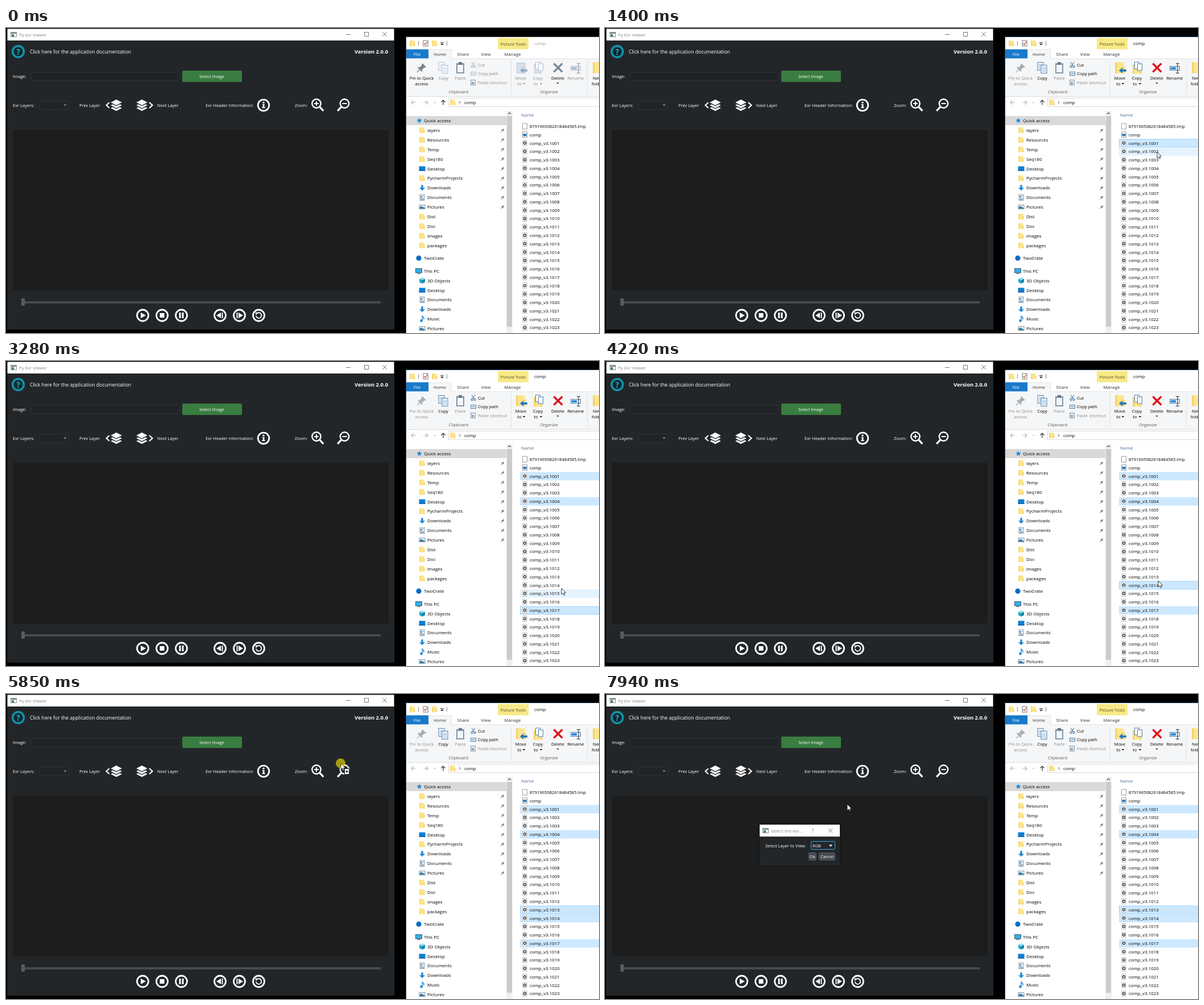
An HTML page with a canvas for the animation above (8 s loop, 1043 by 537 pixels).

```html
<!DOCTYPE html>
<html lang="en">
<head>
<meta charset="utf-8">
<title>Py Exr Viewer</title>
<style>
html, body { margin: 0; width: 100%; height: 100%; overflow: hidden; background: #000; }
canvas { display: block; width: 1043px; height: 537px; }
</style>
</head>
<body>
<canvas id="stage"></canvas>
<script>
const W = 1043, H = 537, LOOP = 8000;
const canvas = document.getElementById('stage');
const dpr = window.devicePixelRatio || 1;
canvas.width = W * dpr;
canvas.height = H * dpr;
const c = canvas.getContext('2d');
const FONT = '"Open Sans", "Noto Sans", sans-serif';
const BODY = '#232629', WHITE = '#fff', INK = '#000', BLUE = '#1e88d8';

// Pointer moves: start, end, steps, target x, target y
const MOVES = [
  [70, 530, 7, 970, 200], [700, 700, 1, 969, 199],
  [1250, 1560, 5, 973, 246], [1790, 2030, 4, 984, 280], [2110, 2110, 1, 984, 299],
  [2190, 2580, 6, 977, 433], [3060, 3280, 4, 977, 400], [3370, 3450, 2, 976, 391],
  [4140, 4220, 2, 973, 387], [4360, 4420, 2, 965, 383],
  [5150, 5150, 1, 955, 386], [5220, 5220, 1, 925, 387], [5300, 5380, 2, 853, 266],
  [5460, 5540, 2, 715, 167], [5620, 5850, 4, 589, 122], [5920, 5920, 1, 564, 118],
  [6000, 6230, 4, 491, 101], [7790, 7940, 3, 426, 194]
];
const PRESSES = [[850, 1010], [1640, 1720], [2980, 3140], [3980, 4140], [4680, 4980], [5150, 6700]];
const PICKS = [[1, 850], [4, 1640], [17, 2980], [14, 3980], [13, 4680]];
const DRAG = 5220, DROP = 6700;

// Share of a stepped change that is done at time t
function stepped(t, start, end, n) {
  if (t < start) return 0;
  if (n === 1 || t >= end) return 1;
  return (Math.floor((t - start) / (end - start) * (n - 1) + 1e-6) + 1) / n;
}

function pointerAt(t) {
  let x = 1052, y = 520;
  for (const [start, end, n, tx, ty] of MOVES) {
    const k = stepped(t, start, end, n);
    x += (tx - x) * k;
    y += (ty - y) * k;
  }
  return [Math.round(x), Math.round(y)];
}

function rect(x, y, w, h, fill, stroke) {
  if (fill) { c.fillStyle = fill; c.fillRect(x, y, w, h); }
  if (stroke) { c.strokeStyle = stroke; c.lineWidth = 1; c.strokeRect(x + .5, y + .5, w - 1, h - 1); }
}

function rounded(x, y, w, h, r, fill, stroke) {
  c.beginPath();
  c.roundRect(x + .5, y + .5, w - 1, h - 1, r);
  if (fill) { c.fillStyle = fill; c.fill(); }
  if (stroke) { c.strokeStyle = stroke; c.lineWidth = 1; c.stroke(); }
}

function trace(pts) {
  c.beginPath();
  for (let i = 0; i < pts.length; i += 2) c.lineTo(pts[i], pts[i + 1]);
}

function poly(fill, ...pts) {
  trace(pts);
  c.closePath();
  c.fillStyle = fill;
  c.fill();
}

function line(color, width, ...pts) {
  trace(pts);
  c.strokeStyle = color;
  c.lineWidth = width;
  c.stroke();
}

function disc(x, y, r, fill) {
  c.beginPath();
  c.arc(x, y, r, 0, 7);
  c.fillStyle = fill;
  c.fill();
}

function ring(x, y, r, width, color, from = 0, to = 7) {
  c.beginPath();
  c.arc(x, y, r, from, to);
  c.strokeStyle = color;
  c.lineWidth = width;
  c.stroke();
}

function text(s, x, y, size = 7.8, color = INK, align = 'left', weight = 400) {
  c.font = `${weight} ${size}px ${FONT}`;
  c.textAlign = align;
  c.fillStyle = color;
  c.fillText(s, x, y);
}

const label = (s, x, y, align) => text(s, x, y, 7.5, WHITE, align);

function cross(x, y, r, color, width) {
  line(color, width, x - r, y - r, x + r, y + r);
  line(color, width, x + r, y - r, x - r, y + r);
}

function windowIcon(x, y) {
  rect(x, y, 11, 9, '#f4f4f4', '#8a8f94');
  rect(x + 1, y + 1, 9, 2, '#7d8b96');
  rect(x + 2, y + 4, 4, 4, '#35826f');
}

/* ---- viewer window ---- */

function layersIcon(x, y) {
  for (const dy of [5, 0, -5]) {
    const pts = [x, y + dy - 5.8, x + 11.5, y + dy, x, y + dy + 5.8, x - 11.5, y + dy];
    poly(WHITE, ...pts);
    line(BODY, 1.4, ...pts, pts[0], pts[1]);
  }
}

function magnifier(x, y, dir, plus) {
  ring(x, y, 7.7, 2.4, WHITE);
  line(WHITE, 2, x - 4, y, x + 4, y);
  if (plus) line(WHITE, 2, x, y - 4, x, y + 4);
  line(WHITE, 3.2, x + dir * 5.8, y + 5.8, x + dir * 12.3, y + 12.8);
}

function playerButtons() {
  const y = 506;
  for (const x of [240.5, 274.5, 308.5, 376.5, 410.5, 444.5]) ring(x, y, 10, 2.8, WHITE);
  poly(WHITE, 237, y - 5, 246, y, 237, y + 5);
  rect(270.5, y - 4, 8, 8, WHITE);
  rect(304.5, y - 5, 3, 10, WHITE);
  rect(309.5, y - 5, 3, 10, WHITE);
  poly(WHITE, 370, y, 378, y - 5, 378, y + 5);
  rect(379.5, y - 5, 2, 10, WHITE);
  rect(405.5, y - 5, 2, 10, WHITE);
  poly(WHITE, 409, y - 5, 417, y, 409, y + 5);
  ring(444.5, y, 4.8, 1.8, WHITE, -2.2, 3);
  poly(WHITE, 438.5, y - 5.5, 444, y - 5, 439.5, y - .5);
}

function viewer() {
  rect(2, 1, 681, 530, BODY);
  rect(2.5, 1.5, 680, 20.5, WHITE);
  windowIcon(8, 7);
  text('Py Exr Viewer', 23, 15, 7.8, '#858585');
  line('#777', 1, 598, 11.5, 606, 11.5);
  rect(630, 7, 8, 8, null, '#777');
  cross(666, 11, 3.8, '#777', 1);

  disc(21.5, 41.5, 11.7, '#1191a6');
  disc(21.5, 41.5, 8, '#0f2630');
  text('?', 21.5, 46.5, 13.5, '#25b4cb', 'center', 700);
  text('Click here for the application documentation', 42, 45, 8.6, WHITE);
  text('Version 2.0.0', 672, 45, 9.4, WHITE, 'right', 700);

  label('Image:', 12, 88);
  rounded(44, 78, 262, 15, 2, '#202326', '#2d3135');
  rounded(309.5, 74.5, 106, 21, 2, '#397d40');
  label('Select Image', 362, 88, 'center');

  label('Exr Layers:', 12, 139);
  rounded(59, 128, 52, 16, 2, '#212427', '#2e3236');
  poly('#7c8084', 101, 134.5, 107, 134.5, 104, 137.8);
  label('Prev Layer', 129, 139);
  line(WHITE, 2.2, 182, 131, 176.5, 136, 182, 141);
  layersIcon(194, 136);
  layersIcon(239, 136);
  line(WHITE, 2.2, 252, 131, 257.5, 136, 252, 141);
  label('Next Layer', 266, 139);
  label('Exr Header Information:', 351, 139);
  ring(453, 136, 9.8, 2.8, WHITE);
  disc(453, 131.3, 1.7, WHITE);
  rect(450.8, 134, 3.6, 1.6, WHITE);
  rect(451.8, 134, 2.6, 6.4, WHITE);
  rect(450.2, 139.4, 5.6, 1.6, WHITE);
  label('Zoom:', 508, 139);
  magnifier(546, 133, 1, true);
  magnifier(595.5, 133, -1, false);

  rect(12, 179, 661, 283, '#1d1d1d');
  rect(30, 481, 629, 4, '#484a4c');
  rounded(26.5, 475.5, 7, 14, 1, '#5a5c5e');
  playerButtons();
}

/* ---- file browser ---- */

function folder(x, y, s = 1) {
  rect(x - 4.5 * s, y - 5 * s, 8 * s, 10 * s, '#fde58a');
  rect(x - 4.5 * s, y - 5 * s, 1.5 * s, 10 * s, '#f4d268');
  rect(x + 2.5 * s, y - 1 * s, 2 * s, 6 * s, '#f6d672');
}

function page(x, y, w = 9, h = 11, edge = '#9a9a9a') {
  rect(x - w / 2, y - h / 2, w, h, WHITE, edge);
}

const navIcons = {
  folder,
  star(x, y) {
    const pts = [];
    for (let i = 0; i < 10; i++) {
      const a = i * Math.PI / 5 - Math.PI / 2, r = i % 2 ? 2.2 : 5;
      pts.push(x + r * Math.cos(a), y + r * Math.sin(a));
    }
    poly(BLUE, ...pts);
  },
  desktop(x, y) {
    rect(x - 5.5, y - 4, 11, 8, '#0f7fd3');
    rect(x - 5.5, y + 2.5, 11, 1.5, '#0b5a9c');
  },
  down(x, y) {
    rect(x - 1.7, y - 5, 3.4, 6, BLUE);
    poly(BLUE, x - 5, y, x + 5, y, x, y + 5);
  },
  doc(x, y) {
    page(x, y, 9, 11, '#8b98a3');
    rect(x - 3, y - 3, 3, 3, '#3d93d6');
    for (let i = 0; i < 3; i++) rect(x - 3, y + 1 + i * 1.6, 6, .8, '#5b7f9e');
    rect(x + .8, y - 3, 2.4, 1, '#5b7f9e');
  },
  picture(x, y) {
    rect(x - 5.5, y - 4, 11, 8, '#e9f3fa', '#8c979f');
    poly('#3b7eaa', x - 4.5, y + 3, x - 4.5, y, x - 1, y - 1.5, x + 4.5, y + 2, x + 4.5, y + 3);
  },
  dot(x, y) { disc(x, y, 4.6, '#0a6cc4'); },
  pc(x, y) {
    rect(x - 6, y - 4.5, 12, 8, '#35b0ee', '#3d5a6c');
    rect(x - 3, y + 4, 6, 1.2, '#3d5a6c');
  },
  cube(x, y) {
    poly('#8fe0ee', x, y - 5.5, x + 5, y - 3, x, y - .5, x - 5, y - 3);
    poly('#22a7c4', x - 5, y - 3, x, y - .5, x, y + 5.5, x - 5, y + 3);
    poly('#1286a8', x + 5, y - 3, x, y - .5, x, y + 5.5, x + 5, y + 3);
  },
  note(x, y) {
    disc(x - 1.5, y + 3.2, 2.3, BLUE);
    line(BLUE, 1.4, x + .2, y + 3, x + .2, y - 5, x + 3.2, y - 1.5, x + 2.6, y + .8);
  }
};

const NAV = [
  ['Quick access', 'star', 163], ['layers', 'folder'], ['Resources', 'folder'], ['Temp', 'folder'],
  ['Seq180', 'folder'], ['Desktop', 'desktop'], ['PycharmProjects', 'folder'], ['Downloads', 'down'],
  ['Documents', 'doc'], ['Pictures', 'picture'], ['Dist', 'folder'], ['Doc', 'folder'],
  ['images', 'folder'], ['packages', 'folder'], ['TwoCrate', 'dot', 405.2], ['This PC', 'pc', 427.7],
  ['3D Objects', 'cube'], ['Desktop', 'desktop'], ['Documents', 'doc'], ['Downloads', 'down'],
  ['Music', 'note'], ['Pictures', 'picture']
];

function navPane() {
  rect(704, 155, 177, 16, '#d9d9d9');
  let y = 0;
  NAV.forEach(([name, icon, top], i) => {
    y = top || y + 16.9;
    const x = top ? 727 : 732;
    navIcons[icon](x - (top && i ? 1 : 0), y);
    text(name, top ? 735 : 741, y + 3, 8);
    if (i > 0 && i < 10) {
      line('#6b7680', 2.2, 872.6, y + 1, 875.5, y - 2);
      line('#6b7680', 1, 871.5, y - 1.4, 875, y + 2);
      line('#6b7680', .9, 873, y + .6, 870, y + 3.6);
    }
  });
  rect(880, 146, 11, 391, '#f0f0f0');
  rect(881, 155, 9, 371, '#cbcbcb');
  line('#505050', 1.2, 883, 151.5, 885.5, 149, 888, 151.5);
}

function ribbon(active) {
  const on = active ? INK : '#8c8c8c', off = '#8c8c8c';
  const soft = active ? '#4d7ba6' : '#a9bccd';
  rect(703, 16, 340, 38, WHITE);
  rect(865, 17.5, 54, 20, '#f8e987');
  text('Picture Tools', 892, 31, 7.5, '#4f4a25', 'center');
  text('comp', 929, 30, 7.8, active ? INK : '#999');
  folder(715, 27);
  line('#888', 1, 725.5, 23, 725.5, 31);
  page(738, 27, 9, 11, '#777');
  line('#c0452b', 1.3, 735.5, 27, 737.5, 29.5, 741, 24);
  folder(754, 27);
  line('#333', 1, 764, 25.5, 770, 25.5);
  poly('#222', 764, 27.5, 770, 27.5, 767, 30.5);
  line('#888', 1, 775.5, 23, 775.5, 31);

  rect(703, 54, 340, 67, '#f5f6f7');
  rect(703, 120, 340, 1, '#dadbdc');
  rect(703.5, 37.5, 39.5, 16, '#1979ca');
  rect(743, 38, 41, 17, '#f5f6f7');
  line('#e2e3e4', 1, 743.5, 54, 743.5, 38, 783.5, 38, 783.5, 54, W, 54);
  text('File', 723, 49, 7.8, WHITE, 'center');
  [['Home', 763], ['Share', 804], ['View', 844], ['Manage', 891]]
    .forEach(([s, x]) => text(s, x, 49, 7.8, '#333', 'center'));

  const caption = (s, x, y, color) => text(s, x, y, 7.6, color, 'center');
  const pinInk = active ? off : INK, pin = active ? '#a5adb5' : '#77838d';
  c.save();
  c.translate(730, 71);
  c.rotate(Math.PI / 4);
  rect(-4.5, -8, 9, 2.5, pin);
  rect(-3, -6, 6, 7, pin);
  rect(-5, 1, 10, 2.5, pin);
  rect(-.7, 3, 1.4, 7, pin);
  c.restore();
  caption('Pin to Quick', 731, 91, pinInk);
  caption('access', 731, 101, pinInk);

  for (const [x, y] of [[766, 67.5], [772, 72.5]]) {
    page(x, y, 11, 15, soft);
    for (let i = 0; i < 4; i++) rect(x - 3.5, y - 4 + i * 2.5, 7, 1, active ? '#7fb0dc' : '#c6d5e3');
  }
  caption('Copy', 769, 91, on);
  rect(792, 62, 14, 18, '#8497a8');
  rect(794, 65, 10, 13, '#f2f6fa');
  rect(796, 60, 6, 4, '#667788');
  caption('Paste', 799, 91, off);

  line(soft, 1.1, 819, 60, 824, 67);
  line(soft, 1.1, 825, 60, 820, 67);
  ring(819.5, 68, 1.6, 1.1, soft);
  ring(824.5, 68, 1.6, 1.1, soft);
  text('Cut', 830, 67.5, 7.6, on);
  rect(817, 77, 10, 7, '#eef4fa', soft);
  rect(819, 80, 6, 1, soft);
  text('Copy path', 830, 83, 7.6, on);
  rect(817, 91, 9, 10, '#e6ecf2', '#8497a8');
  rect(819, 95, 4, 4, '#8fa3b5');
  text('Paste shortcut', 830, 98.5, 7.6, off);
  caption('Clipboard', 796, 115, '#5a5a5a');
  line('#e0e1e2', 1, 888.5, 58, 888.5, 117);

  if (active) {
    folder(906, 70, 1.9);
    folder(936, 72, 1.7);
  } else {
    rect(898, 61, 16, 19, '#d5dfe9', '#bccbd9');
    rect(929, 64, 13, 16, '#d5dfe9', '#bccbd9');
  }
  const blue = active ? '#2277c4' : '#93abc0';
  rect(909, 73, 8, 3.6, blue);
  poly(blue, 904, 74.8, 910, 69.5, 910, 80);
  page(935.5, 66, 9, 13, soft);
  page(940.5, 69, 9, 13, soft);
  cross(971, 70, 7.5, active ? '#e0121d' : '#7b8893', 3.4);
  rect(993, 67, 18, 8, active ? '#e8f2fb' : '#eef1f4', soft);
  rect(995, 69, 9, 4, active ? '#2b88d8' : '#a9bccd');
  line(active ? '#444' : '#999', 1.2, 1004, 62.5, 1010, 62.5);
  line(active ? '#444' : '#999', 1.2, 1007, 62.5, 1007, 79, 1004, 79.5, 1010, 79.5);
  caption('Move', 905.5, 91, on);
  caption('to', 903, 101, on);
  caption('Copy', 935.5, 91, on);
  caption('to', 932, 101, on);
  caption('Delete', 970.5, 91, INK);
  caption('Rename', 1002, 91, on);
  for (const [x, y] of [[911, 98], [941, 98], [970.5, 97]]) {
    poly(x > 960 ? '#333' : on, x - 2.2, y - 1, x + 2.2, y - 1, x, y + 1.4);
  }
  caption('Organize', 955, 115, '#5a5a5a');
  line('#e0e1e2', 1, 1022.5, 58, 1022.5, 117);
  folder(1041, 70, 1.9);
  text('New', 1032, 91, 7.6);
  text('folder', 1030, 101, 7.6);
}

function addressBar() {
  line('#b5b5b5', 1.1, 721, 131, 713, 131, 716.5, 127.5);
  line('#b5b5b5', 1.1, 713, 131, 716.5, 134.5);
  line('#b5b5b5', 1.1, 734, 131, 742, 131, 738.5, 127.5);
  line('#b5b5b5', 1.1, 742, 131, 738.5, 134.5);
  line('#b5b5b5', 1, 752, 130, 754, 132, 756, 130);
  line('#333', 1.2, 769, 135.5, 769, 127);
  line('#333', 1.2, 765.5, 130.5, 769, 127, 772.5, 130.5);
  rect(778, 123, 270, 16, WHITE, '#d9d9d9');
  folder(786, 131);
  line('#555', 1, 797, 128.5, 799.3, 131, 797, 133.5);
  text('comp', 806, 134, 7.9);
}

const ROW = 14.77, LIST_TOP = 195.4;

function fileList(t, hover) {
  text('Name', 906, 156, 8, '#4a6a9c');
  const picked = PICKS.filter(p => t >= p[1]).map(p => p[0]);
  const focus = picked[picked.length - 1];
  page(912.5, 173);
  text('8791965082618484585.tmp', 921, 176, 7.6);
  page(912.5, 187.7);
  rect(909.5, 186, 6, 4.5, '#2f7fc1');
  text('comp', 921, 190.7, 7.9);
  for (let i = 1; i <= 24; i++) {
    const top = LIST_TOP + ROW * (i - 1), y = top + 7.1;
    if (picked.includes(i)) rect(904, top, 145, ROW, '#cce8ff', i === focus ? '#a4d5fa' : null);
    else if (i === hover) rect(904, top, 145, ROW, '#e5f3ff');
    page(912.5, y, 8, 10.5, '#bdbdbd');
    ring(912.5, y, 2.1, 1.7, '#4b5053');
    text('comp_v3.' + (1000 + i), 921, y + 3, 7.9);
  }
}

function explorer(t, px, py) {
  const active = t >= 930;
  rect(703, 16, 340, 521, WHITE);
  ribbon(active);
  addressBar();
  navPane();
  const pointing = t >= 70 && t < DRAG && px < W;
  fileList(t, pointing ? Math.floor((py + 3 - LIST_TOP) / ROW) + 1 : 0);
  line(active ? '#1f3f59' : '#404040', 1, 703.5, H, 703.5, 15.5, W, 15.5);
}

/* ---- overlays ---- */

function dialog(alpha) {
  if (!alpha) return;
  c.save();
  c.globalAlpha = alpha;
  c.shadowColor = 'rgba(0,0,0,.5)';
  c.shadowBlur = 5;
  rect(272, 230, 141, 72, BODY);
  c.shadowColor = 'transparent';
  rect(272, 230, 141, 21, WHITE);
  windowIcon(277, 236);
  text('Select the exr...', 292, 244, 7.9, '#858585');
  text('?', 365, 244, 8.6, '#777', 'center');
  cross(396.5, 240.5, 3.6, '#777', 1);
  label('Select Layer to View:', 282, 270);
  rounded(362, 259, 43, 15, 2, BODY, '#3daee9');
  label('RGB', 365, 270);
  poly(WHITE, 394, 265.5, 400, 265.5, 397, 269);
  for (const [s, x, w] of [['Ok', 358, 14], ['Cancel', 376, 29]]) {
    rounded(x, 279, w, 14, 2, '#434a50', '#555c62');
    label(s, x + w / 2, 289, 'center');
  }
  c.restore();
}

function dragImage(x, y) {
  const l = x - 36, top = y - 66;
  const g = c.createLinearGradient(l, top, l, top + 74);
  g.addColorStop(0, 'rgba(244,248,251,.55)');
  g.addColorStop(1, 'rgba(190,218,238,.55)');
  rect(l, top, 73, 74, g);
  line('rgba(120,140,155,.4)', 1.5, l + 72.5, top, l + 72.5, top + 73.5, l, top + 73.5);
  rect(x - 6, y - 36, 11, 12, '#0f78d0');
  text('5', x - .5, y - 27, 8, WHITE, 'center');
}

function pointer(x, y, copying) {
  if (copying) {
    rect(x + 6, y + 9, 9, 11, WHITE, '#222');
    line('#222', 1.2, x + 10.5, y + 12, x + 10.5, y + 17);
    line('#222', 1.2, x + 8, y + 14.5, x + 13, y + 14.5);
  }
  const shape = [0, 0, 0, 11, 2.6, 8.7, 4.2, 12.3, 5.9, 11.6, 4.4, 8, 7.6, 8];
  const pts = shape.map((v, i) => v + (i % 2 ? y : x));
  poly(WHITE, ...pts);
  line('#111', .8, ...pts, pts[0], pts[1]);
}

function draw(t) {
  const [x, y] = pointerAt(t);
  c.setTransform(dpr, 0, 0, dpr, 0, 0);
  rect(0, 0, W, H, '#000');
  viewer();
  explorer(t, x, y);
  dialog(stepped(t, 6780, 7010, 4));
  const dragging = t >= DRAG && t < DROP;
  const pressed = PRESSES.some(([a, b]) => t >= a && t < b);
  if (dragging && x > 703) dragImage(x, y);
  if (pressed) disc(x - .5, y, 8.5, 'rgba(235,220,0,.65)');
  pointer(x, y, dragging && x < 703);
}

const begin = performance.now();
function frame() {
  draw((performance.now() - begin) % LOOP);
  requestAnimationFrame(frame);
}
frame();
</script>
</body>
</html>
```
